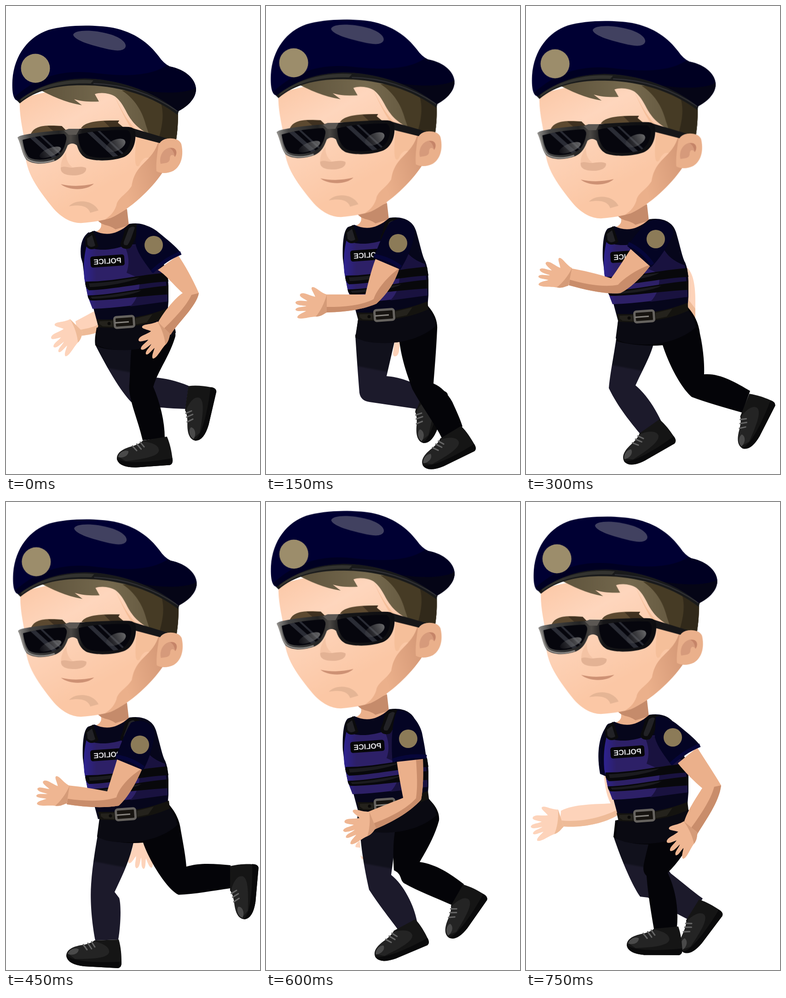
Write an HTML page that moves like this. It is 552 px wide and 1014 px high and loops after 0.9 s.

```html
<!DOCTYPE html>
<html lang="en">
<head>
<meta charset="utf-8">
<title>Running officer</title>
<style>
html, body { margin: 0; width: 100%; height: 100%; overflow: hidden; background: #fff; }
svg { display: block; width: 100vw; height: 100vh; }

.pose { animation: pose .9s step-end infinite; animation-delay: calc((var(--i) - 6) * 150ms); }
.torso { animation: torso .9s step-end infinite; }
.belt { animation: belt .9s step-end infinite; }
.head { transform-origin: 160px 470px; animation: head .9s step-end infinite; }

@keyframes pose {
  0% { visibility: visible; }
  16.666%, 100% { visibility: hidden; }
}
@keyframes torso {
  0% { transform: none; }
  16.666% { transform: translateY(-13px); }
  33.333% { transform: translateY(-10px); }
  49.999% { transform: translateY(-5px); }
  66.666% { transform: translateY(-23px); }
  83.333%, 100% { transform: translateY(-11px); }
}
@keyframes belt {
  0% { transform: none; }
  16.666% { transform: translateY(-15px); }
  33.333% { transform: translateY(-12px); }
  49.999% { transform: translate(3px, -8px); }
  66.666% { transform: translate(1px, -29px); }
  83.333%, 100% { transform: translateY(-5px); }
}
@keyframes head {
  0% { transform: none; }
  16.666% { transform: translateY(-13px) rotate(-.65deg); }
  33.333% { transform: translateY(-10px) rotate(-.15deg); }
  49.999% { transform: translateY(-5px) rotate(.3deg); }
  66.666% { transform: translateY(-23px) rotate(-.6deg); }
  83.333%, 100% { transform: translateY(-11px) rotate(.55deg); }
}

.near { fill: #040408; }
.far { fill: url(#farLeg); }
.skin { fill: #ebb08b; }
.pale { fill: #fdd3ba; }
.shade { fill: #c98d6b; }
.paleShade { fill: #eebb98; }
.sleeve { fill: #040424; }
.cuff { fill: none; stroke: #06063a; stroke-width: 8; }
.crest { fill: #8c7b58; }
</style>
</head>
<body>
<svg viewBox="0 0 552 1014">
<defs>
  <linearGradient id="farLeg" gradientUnits="userSpaceOnUse" x1="225" y1="700" x2="195" y2="860">
    <stop offset=".5" stop-color="#11111c"/><stop offset=".53" stop-color="#1c1a2b"/>
  </linearGradient>
  <linearGradient id="face" x1="0" y1="0" x2=".6" y2="1">
    <stop offset="0" stop-color="#fbc5a2"/><stop offset=".35" stop-color="#fed6bd"/><stop offset=".8" stop-color="#fbc7a5"/>
  </linearGradient>
  <linearGradient id="cheek" x1=".2" y1=".7" x2="1" y2=".4">
    <stop offset=".2" stop-color="#ebb08b"/><stop offset="1" stop-color="#d69a78"/>
  </linearGradient>
  <linearGradient id="hair">
    <stop offset="0" stop-color="#5d523b"/><stop offset=".5" stop-color="#75694e"/><stop offset="1" stop-color="#5c5038"/>
  </linearGradient>
  <linearGradient id="rim">
    <stop offset="0" stop-color="#8d8b88"/><stop offset=".1" stop-color="#444"/><stop offset=".35" stop-color="#242424"/>
    <stop offset=".45" stop-color="#4a4744"/><stop offset=".55" stop-color="#161618"/><stop offset="1" stop-color="#0d0d10"/>
  </linearGradient>
  <linearGradient id="gloss" x2="1">
    <stop offset="0" stop-color="#666" stop-opacity=".1"/><stop offset="1" stop-color="#888" stop-opacity=".75"/>
  </linearGradient>
  <linearGradient id="vest">
    <stop offset="0" stop-color="#2d2290"/><stop offset=".15" stop-color="#2d2067"/><stop offset="1" stop-color="#2d2067"/>
  </linearGradient>
  <clipPath id="lenses">
    <path id="lensPath" d="M36 290C68 281 100 278 126 277Q134 282 130 294C126 310 120 320 108 326C88 334 62 336 49 327C41 317 38 303 36 290ZM157 278C190 270 235 268 264 269Q273 274 271 290C268 308 258 321 242 325C218 330 190 330 176 323C162 313 157 296 157 278Z"/>
  </clipPath>
  <g id="shoe">
    <path fill="#151515" d="M-28 2L25 0C30 17 31 34 31 47Q32 60 24 62L-50 58Q-86 54 -89 36C-89 22 -75 15 -55 12C-42 10 -32 6 -28 2Z"/>
    <path fill="#242424" d="M-28 4C-10 8 6 16 4 28C0 42 -40 42 -70 42L-86 30C-82 20 -70 15 -55 13C-42 11 -32 8 -28 4Z"/>
    <path fill="#0a0a0b" d="M-89 34C-76 48 -20 51 31 48Q32 60 24 62L-50 58Q-86 54 -89 34Z"/>
    <path fill="#4a4a4a" d="M-86 31C-82 20 -68 17 -62 21C-62 30 -74 36 -86 31Z"/>
    <path fill="none" stroke="#666" stroke-width="3" stroke-linecap="round" d="M-52 11l8 11m2-14l8 12m0-15l7 11"/>
  </g>
  <path id="hand" d="M2-20C-12-24-22-37-29-36C-35-34-26-24-23-15C-35-17-46-25-54-22C-62-17-48-11-40-6C-50-5-62-9-66-3C-66 4-50 4-42 5C-50 8-64 6-66 13C-64 18-50 15-43 16C-50 20-62 24-62 30C-56 36-35 28-22 28C-10 28-5 22 2 19Z"/>
  <path id="palm" d="M2-20C-3 0-13 18-22 28C-10 28-5 22 2 19Z"/>
  <g id="nearHand"><use href="#hand" fill="#efb692"/><use href="#palm" fill="#d59b78"/></g>
  <g id="farHand"><use href="#hand" class="pale"/><use href="#palm" class="paleShade"/></g>
  <g id="backSleeve">
    <path class="sleeve" d="M284 473C306 473 320 481 332 491C350 506 370 521 379 534L318 578C305 560 288 540 282 518Z"/>
    <path class="cuff" d="M380 535Q345 549 317 576"/>
    <circle class="crest" cx="321" cy="518" r="20"/>
  </g>
</defs>

<!-- far arm and legs -->
<g class="pose" style="--i:0">
  <path class="sleeve" d="M180 490C165 500 160 520 163 545L172 575L190 520Z"/>
  <path class="pale" d="M194 660Q172 672 151 683L156 715Q180 714 202 706Z"/>
  <path class="paleShade" d="M156 715L154 702Q180 700 202 690V706Q180 714 156 715Z"/>
  <use href="#farHand" transform="translate(152 694) rotate(-45)"/>
  <path class="far" d="M194 734C215 775 245 830 272 858C310 870 360 872 390 873L397 823C370 812 345 806 322 805L290 740Z"/>
  <use href="#shoe" transform="translate(392 848) rotate(-80)"/>
  <path class="near" d="M197 697L350 668C362 685 370 705 368 716C355 760 330 790 320 825C335 860 345 900 345 936L297 941C285 890 265 850 268 820C270 790 270 770 272 745C240 746 210 745 194 735C192 720 195 710 197 697Z"/>
  <use href="#shoe" transform="translate(325 936) rotate(-7)"/>
</g>
<g class="pose" style="--i:1">
  <path class="pale" d="M280 722L291 728C290 740 290 754 284 758Q276 762 276 752Z"/>
  <use href="#shoe" transform="translate(329 852) rotate(-76)"/>
  <path class="far" d="M194 712C197 760 200 800 203 838C205 850 212 856 225 858L328 873L345 828C310 812 290 804 262 802L280 724Z"/>
  <path class="near" d="M200 680L352 650C368 668 373 685 372 700C370 745 366 790 364 818C380 824 395 840 405 858C415 880 422 895 427 911L382 936C370 910 340 870 318 830C305 795 295 765 290 728C250 732 215 728 194 718Z"/>
  <use href="#shoe" transform="translate(402 922) rotate(-29)"/>
</g>
<g class="pose" style="--i:2">
  <path class="pale" d="M345 563C362 573 368 600 368 640V676L350 650Z"/>
  <path class="paleShade" d="M348 630Q356 640 368 656V676L350 656Z"/>
  <path class="far" d="M200 690C195 740 183 790 180 828C200 870 230 905 248 927L294 900C280 870 260 840 238 822C250 795 270 760 277 733Z"/>
  <use href="#shoe" transform="translate(269 909) rotate(-33)"/>
  <path class="near" d="M200 683L352 653C365 668 375 685 378 710C385 740 388 775 387 798C420 795 455 815 487 834L470 881C430 870 390 858 360 847C335 825 310 775 297 735C260 738 220 733 196 726Z"/>
  <use href="#shoe" transform="translate(475 863) rotate(-66)"/>
</g>
<g class="pose" style="--i:3">
  <use href="#farHand" transform="translate(292 728) rotate(-85)"/>
  <path class="far" d="M205 690C198 730 188 780 185 828C182 870 188 920 194 950L244 948C249 920 251 875 246 858L236 845C250 815 268 780 277 738Z"/>
  <use href="#shoe" transform="translate(220 948)"/>
  <path class="near" d="M205 690L352 653C372 675 378 695 380 712C385 740 390 765 392 790C425 780 460 785 488 787L487 837C450 842 410 850 375 851C350 840 310 775 298 738C265 741 230 737 198 726Z"/>
  <use href="#shoe" transform="translate(486 814) rotate(-88)"/>
</g>
<g class="pose" style="--i:4">
  <path class="pale" d="M204 734Q192 742 195 748L205 749ZM205 766l4 9l5-4z"/>
  <path class="far" d="M203 675C203 740 215 800 224 840C250 880 275 910 290 931L328 908C322 875 300 830 272 808L285 710Z"/>
  <path class="near" d="M205 668L345 636C365 652 378 670 376 690C365 730 345 760 334 780C370 785 400 805 430 828L408 875C370 858 330 843 300 826C290 818 296 806 278 798C276 770 276 740 280 715L203 700Z"/>
  <use href="#shoe" transform="translate(415 850) rotate(-58)"/>
  <use href="#shoe" transform="translate(302 915) rotate(-26)"/>
</g>
<g class="pose" style="--i:5">
  <path class="pale" d="M169 585C171 620 177 640 184 653C150 655 105 654 76 669L73 702C110 707 165 700 202 676L195 600Z"/>
  <path class="paleShade" d="M73 702L76 690C120 694 165 684 200 666V678C165 700 110 707 73 702Z"/>
  <path class="sleeve" d="M180 480C160 500 152 540 161 589L175 595L190 520Z"/>
  <use href="#farHand" transform="translate(74 686) rotate(-18)"/>
  <path class="far" d="M190 724C205 770 230 830 248 855L265 857L330 893L355 906L384 859C360 842 335 820 315 805L265 740Z"/>
  <use href="#shoe" transform="translate(362 882) rotate(-56)"/>
  <path class="near" d="M194 690L350 660C358 690 358 715 340 765Q324 788 308 803C325 840 332 880 328 922L278 925C272 890 265 850 262 810C252 800 255 790 258 775L266 742C240 742 215 738 190 726Z"/>
  <use href="#shoe" transform="translate(306 921) rotate(-3)"/>
</g>

<g class="torso">
  <path class="skin" d="M200 455C212 475 208 485 192 490C215 502 240 500 268 488C266 470 263 450 262 435Z"/>
  <path fill="#c58b6b" d="M198 463L263 440L267 475L238 484C222 472 210 478 198 463Z"/>
  <path fill="#06061b" d="M192 487C215 498 240 497 268 472C300 467 320 480 326 500C335 530 340 556 346 566Q352 580 353 606V640L350 678L200 692L190 655L178 630L172 600L167 560C166 530 168 500 178 492Z"/>
  <path fill="url(#vest)" d="M175 520C195 532 230 530 262 518L290 516C298 540 310 560 345 572L350 640C300 645 240 655 188 656L178 630L170 590C168 560 170 540 175 520Z"/>
  <path fill="#19123f" d="M258 520L290 516C298 540 310 560 345 572L352 640L270 651Q292 630 290 590L262 578Q272 550 258 520Z"/>
  <path fill="#08080b" d="M173 597C230 598 290 582 350 578L353 597C300 599 235 614 180 616Q170 608 173 597ZM178 627C235 626 300 609 353 606V625C300 627 235 638 184 638Q177 634 178 627Z"/>
  <path fill="#1b1b1f" d="M180 601C220 600 260 592 290 588C275 598 215 608 182 609ZM184 630C220 629 260 620 294 616C280 626 220 634 187 634Z"/>
  <path fill="#0b0b0d" d="M172 502L189 487C194 500 198 512 201 521C190 530 178 529 173 518ZM262 478C275 468 285 471 291 480C281 500 277 518 269 525C255 529 246 522 250 511C256 500 255 488 262 478Z"/>
  <path fill="#222226" d="M176 504L187 496L194 519Q184 526 177 517ZM267 482Q276 475 280 480C274 498 270 510 264 518Q254 520 256 511Z"/>
  <g transform="translate(220.5 552.5) rotate(-4)">
    <rect x="-37" y="-12" width="74" height="24" rx="5" fill="#060608"/>
    <text transform="scale(-1 1)" y="5.8" text-anchor="middle" fill="#e4e4e8" font-family="'Liberation Sans', Arial, sans-serif" font-size="16.2" font-weight="700">POLICE</text>
  </g>
</g>

<g class="belt">
  <path fill="#0a0a12" d="M200 694L350 668C360 680 368 695 369 708C340 735 290 748 245 745C220 744 205 740 195 732Z"/>
  <path fill="#14130f" d="M197 679C250 682 305 673 351 655L353 672C310 692 250 700 201 696Z"/>
  <path fill="#24221c" d="M203 683L232 682V695L210 694L203 689ZM282 677L318 668L306 685L282 690Z"/>
  <circle cx="224" cy="688" r="3.5" fill="#0a0908"/>
  <g transform="rotate(-4 257 684)">
    <rect x="236" y="673" width="42" height="23" rx="4" fill="#171410" stroke="#66635f" stroke-width="5"/>
    <path d="M237 685H267" stroke="#85827d" stroke-width="3"/>
  </g>
</g>

<!-- near arm -->
<g class="pose" style="--i:0">
  <path class="skin" d="M374 540C388 560 405 590 419 622C415 650 370 690 358 712L328 690C340 665 370 630 384 622C365 605 345 580 330 572Z"/>
  <path class="shade" d="M419 622C415 650 370 690 358 712L340 702C365 678 392 650 403 626Z"/>
  <use href="#nearHand" transform="translate(342 699) rotate(-45)"/>
  <use href="#backSleeve"/>
</g>
<g class="pose" style="--i:1">
  <path class="skin" d="M238 548L290 568C280 600 262 625 240 645C205 660 165 663 130 664L127 625C160 625 190 625 216 625C222 600 228 575 238 548Z"/>
  <path class="shade" d="M240 645C205 660 165 663 130 664L132 652C170 653 210 648 234 635C240 615 265 585 290 568C280 600 262 625 240 645Z"/>
  <use href="#nearHand" transform="translate(130 645)"/>
  <path class="sleeve" d="M268 470C295 452 322 465 323 490C320 520 305 550 292 571L233 546C245 520 255 490 268 470Z"/>
  <path class="cuff" d="M235 541Q268 547 293 566"/>
  <circle class="crest" cx="287" cy="514" r="20"/>
</g>
<g class="pose" style="--i:2">
  <path class="skin" d="M228 526L272 560C250 590 225 612 205 622C170 625 130 615 93 605L95 568C125 573 155 580 185 590C200 570 212 550 228 526Z"/>
  <path class="shade" d="M205 622C170 625 130 615 93 605L95 593C130 603 170 610 200 604C215 588 245 568 272 560C250 590 225 612 205 622Z"/>
  <use href="#nearHand" transform="translate(94 587) rotate(12)"/>
  <path class="sleeve" d="M268 465C300 456 321 475 320 495C305 525 290 548 272 566L220 520C235 500 250 480 268 465Z"/>
  <path class="cuff" d="M222 515Q255 530 275 560"/>
  <circle class="crest" cx="282" cy="505" r="20"/>
</g>
<g class="pose" style="--i:3">
  <path class="skin" d="M242 556L296 578C282 610 265 640 245 658C210 664 170 661 132 655L135 614C165 617 195 622 220 627C228 600 235 580 242 556Z"/>
  <path class="shade" d="M245 658C210 664 170 661 132 655L134 643C170 648 210 650 240 640C245 620 270 592 296 578C282 610 265 640 245 658Z"/>
  <use href="#nearHand" transform="translate(133 634) rotate(9)"/>
  <path class="sleeve" d="M272 478C300 466 324 485 323 505C318 535 310 560 298 581L237 556C250 525 260 495 272 478Z"/>
  <path class="cuff" d="M239 551Q272 556 299 576"/>
  <circle class="crest" cx="291" cy="526" r="20"/>
</g>
<g class="pose" style="--i:4">
  <path class="skin" d="M284 560L341 555C342 590 342 620 337 645C310 675 270 695 237 709L220 672C250 660 275 650 298 641C293 615 288 590 284 560Z"/>
  <path class="shade" d="M337 645C310 675 270 695 237 709L232 697C270 683 305 665 326 642C330 615 328 590 326 556H341C342 590 342 620 337 645Z"/>
  <use href="#nearHand" transform="translate(230 690) rotate(-22)"/>
  <path class="sleeve" d="M285 452C310 448 332 475 339 500C343 520 347 540 348 556L275 564C272 530 272 480 285 452Z"/>
  <path class="cuff" d="M275 560Q312 547 349 552"/>
  <circle class="crest" cx="309" cy="513" r="20"/>
</g>
<g class="pose" style="--i:5">
  <path class="skin" d="M372 532C390 560 410 590 424 614C420 650 390 690 372 720L343 695C350 670 370 640 383 620C365 605 345 585 330 566Z"/>
  <path class="shade" d="M424 614C420 650 390 690 372 720L356 710C378 680 402 645 409 617Z"/>
  <use href="#nearHand" transform="translate(357 706) rotate(-51)"/>
  <use href="#backSleeve" transform="translate(-2 -8)"/>
</g>

<g class="head">
  <path fill="url(#face)" d="M30 200C28 235 36 265 40 290C40 350 52 375 100 435C122 462 148 472 166 470C190 468 210 465 228 459C270 440 315 398 340 361L350 300L300 190L180 165Z"/>
  <path fill="#f5bf9a" d="M236 196C250 220 258 245 290 275L335 290L330 340C318 330 300 318 290 345C275 360 282 300 284 280C265 260 250 225 236 196Z"/>
  <path fill="url(#cheek)" d="M332 290C326 315 312 328 300 340C282 357 276 372 273 390C262 408 242 416 240 432C234 450 222 458 214 463L228 459C270 440 315 398 340 361Z"/>
  <path fill="url(#hair)" d="M70 180C98 194 128 209 165 215L148 202C165 207 185 208 202 207L193 191C207 186 225 189 237 196C255 210 260 230 272 246C285 265 310 280 335 288L370 289C373 270 374 250 374 228C330 190 250 165 180 165C130 165 100 172 70 180Z"/>
  <path fill="#463b25" d="M252 183C285 205 298 235 304 258L310 276L335 288L370 289C373 270 374 250 374 226C335 200 290 182 252 183Z"/>
  <path fill="#31291a" d="M335 205C346 235 338 265 332 287L370 289C373 270 374 250 374 228Z"/>
  <path fill="#eab08b" d="M333 293C350 283 376 285 381 299C386 320 383 345 364 357C350 364 336 363 327 358C325 340 330 310 333 293Z"/>
  <path fill="#d69a7b" d="M336 342C332 325 342 309 356 307C370 306 374 318 367 327C362 320 356 322 356 332C354 342 344 340 336 342Z"/>
  <path fill="#c58468" d="M356 308C370 305 374 318 367 327C365 316 362 311 356 308Z"/>

  <path fill="#5c4930" d="M54 277C60 263 76 258 104 259L121 260L130 269L90 276ZM163 265C170 252 195 247 246 248L243 253L255 263L210 268Z"/>
  <path fill="#3f3120" d="M90 260L121 260L130 269L104 272ZM212 249L246 248L243 253L255 263L228 265Z"/>

  <path fill="#161618" d="M276 265L350 287Q338 290 334 297L280 283Z"/>
  <path fill="url(#rim)" d="M25 285Q28 281 40 279C70 273 100 271 128 269L137 266H160C200 263 240 261 267 262Q279 263 281 272C284 300 272 322 254 328C230 336 195 337 175 330C160 322 157 310 154 302Q144 294 134 302C128 318 122 328 108 335C85 344 58 344 44 333C34 320 33 300 25 285Z"/>
  <path fill="none" stroke="#8f8c88" stroke-width="3" stroke-linecap="round" d="M28 287C36 304 36 322 47 332C60 341 84 341 104 334"/>
  <use href="#lensPath" fill="#06060d"/>
  <g clip-path="url(#lenses)">
    <path fill="none" stroke="#777c88" stroke-opacity=".32" stroke-width="9" d="M48 276L110 332M170 262L245 332"/>
    <path fill="none" stroke="#777c88" stroke-opacity=".32" stroke-width="4" d="M66 272L126 328M192 262L264 330"/>
    <ellipse cx="96" cy="317" rx="25" ry="9" transform="rotate(-22 96 317)" fill="url(#gloss)"/>
    <ellipse cx="238" cy="302" rx="23" ry="12" transform="rotate(-25 238 302)" fill="url(#gloss)"/>
  </g>
  <path fill="#5b5753" d="M126 270L137 266H160L153 279H136Z"/>

  <path fill="#f4c3a4" d="M131 317C125 325 119 335 119 350L144 349C134 342 130 330 131 317Z"/>
  <path fill="#e3b294" d="M119 350C118 363 130 367 148 367C165 367 176 360 174 351C166 347 155 349 145 350C134 350 126 346 119 350Z"/>
  <path fill="#cd9174" d="M119 386C140 391 166 391 191 385C176 400 138 401 119 386Z"/>
  <path fill="#e5b595" d="M137 434C150 419 188 418 201 443L183 448C178 432 158 430 137 434Z"/>

  <path fill="#191a1b" d="M22 203C70 168 130 150 190 154C270 158 335 188 377 222L373 236C320 196 250 174 180 172C120 170 68 179 30 211Z"/>
  <path fill="#33332f" d="M32 202C70 172 130 156 190 161L184 168C125 166 75 175 32 206Z"/>
  <path fill="none" stroke="#34343a" stroke-width="2" d="M190 168C265 170 325 196 373 228"/>
  <path fill="#000033" d="M22 204C14 198 13 180 14 160C18 105 50 66 92 52C130 41 190 40 232 47C280 57 310 80 332 109Q342 124 356 131C392 138 413 160 413 181C412 204 390 220 374 228C335 195 270 165 195 158C130 153 75 168 26 205Z"/>
  <path fill="#000022" d="M18 198C70 150 130 136 200 146C260 153 315 152 350 128Q354 130 356 131C392 138 413 160 413 181C412 204 390 220 374 228C335 195 270 165 195 158C130 153 75 168 26 205Z"/>
  <path fill="#050516" d="M413 178C412 204 390 220 374 228C350 208 325 194 295 182C340 190 385 190 413 178Z"/>
  <path fill="#414160" d="M146 62C150 51 190 51 225 61C250 68 262 80 260 88C256 100 235 97 215 92C190 86 148 75 146 62Z"/>
  <circle cx="64" cy="135" r="31.5" fill="#9c8d6b"/>
</g>
</svg>
</body>
</html>
```
